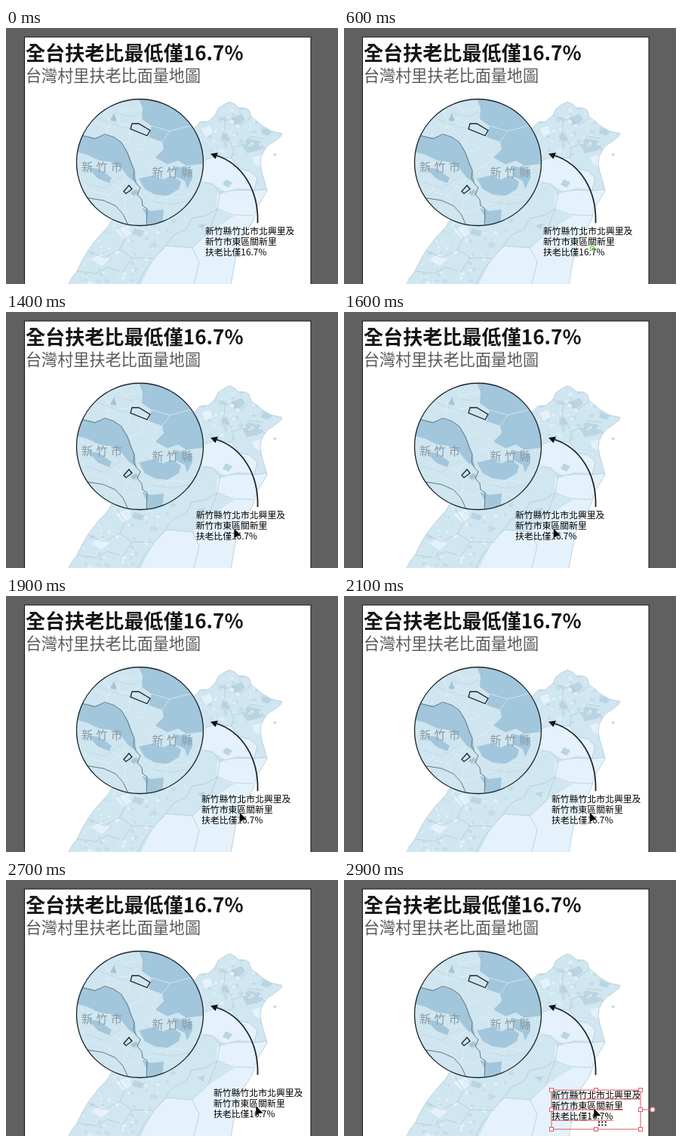
These frames come from a looping animation (440 by 340 pixels, 3 s). An HTML page:

```html
<!DOCTYPE html>
<html lang="zh-Hant">
<head>
<meta charset="utf-8">
<style>
  html, body { margin: 0; width: 100%; height: 100%; overflow: hidden; background: #606060; }
  svg { display: block; width: 440px; height: 340px; font-family: "Noto Sans CJK TC", "Noto Sans CJK", sans-serif; }
  .title { font-size: 26.1px; font-weight: 700; fill: #151515; }
  .sub { font-size: 21.1px; fill: #58595b; }
  .place { font-size: 15px; font-weight: 300; letter-spacing: 4.5px; fill: #8798a3; }
  .note { font-size: 11.85px; font-weight: 500; fill: #000; }
  .line { fill: none; stroke: #adc4ce; stroke-width: .7; }
  .white { fill: none; stroke: #e4f1f7; stroke-width: .7; }
  .ink { fill: none; stroke: #1b242a; stroke-width: 1.3; }
  .light { fill: #e5f2fb; }
  .mid { fill: #b9d4e2; }
  .dark { fill: #a2c6db; }
  #frame { fill: none; stroke: #df5a60; stroke-width: 1; }
  #frame .grip { fill: #fff; }
</style>
</head>
<body>
<svg viewBox="0 0 440 340">
  <defs>
    <path id="coast" d="M250 133L257 125 268 124 277 116 281 107 290 101 296 98 303 101 308 106 316 106 322 109 325 118 333 124 340 130 352 137 366 140 364 144 354 152 347 156 342 163 338 171 337 180 339 191 343 205 346 216 342 223 337 231 332 239 330 248 326 259 319 270 311 282 306 296 302 318 298 342H82L87 332 94 323 101 309 109 295 122 278 135 264 144 248 180 180Z"/>
    <clipPath id="land"><use href="#coast"/></clipPath>
    <clipPath id="lens"><circle cx="177.5" cy="178.5" r="84"/></clipPath>
  </defs>

  <rect width="440" height="340" fill="#606060"/>
  <rect x="24.5" y="12" width="379.5" height="340" fill="#fff" stroke="#111"/>
  <text class="title" x="26" y="43">全台扶老比最低僅16.7%</text>
  <text class="sub" x="26" y="70.5">台灣村里扶老比面量地圖</text>

  <use href="#coast" fill="#d0e6f0"/>
  <g clip-path="url(#land)">
    <g class="light">
      <path d="M258 176L276 171 299 173 309 187 323 190 333 199 329 214 307 212 293 219 274 207 260 204Z"/>
      <path d="M280 222L304 216 330 216 346 214 331 248 306 252 279 240Z"/>
      <path d="M196 306L214 289 246 292 268 272 299 252 330 247 300 342H178Z"/>
      <path d="M259 134L270 130 274 139 265 145ZM326 172L338 169 337 184 330 181Z"/>
      <path d="M145 268L158 263 167 272 156 280ZM112 307L126 300 137 307 127 316Z"/>
    </g>
    <g class="mid">
      <path d="M313 155L322 147 337 150 342 160 330 164 319 166Z"/>
      <path d="M300 119L312 114 317 121 308 130 298 126Z"/>
      <path d="M284 143L292 139 297 148 289 153ZM340 132L353 138 347 143 338 140Z"/>
      <path d="M291 201L300 205 295 212 287 208ZM170 266L183 270 179 277 167 273ZM253 262L264 260 261 268Z"/>
    </g>
    <g id="specks"></g>
    <path class="line" d="M262 205L274 207 284 218 280 240 265 249 246 253M284 218L304 215 329 216 346 214M299 173L309 187 323 190 333 199 329 216M262 176L276 171 299 173 302 158 315 154 323 144 341 147M280 240L300 248 328 249M246 253L239 267 222 275 211 289 197 306 184 322 175 340M211 289L247 292 268 272 280 240M147 262L158 278 151 294 167 305 197 306M109 296L130 305 151 294M94 323L119 326 134 318 155 324 167 305M247 292L256 311 249 340M280 117L291 123 301 119 310 130 324 119M291 123L288 141 302 158"/>
  </g>
  <use href="#coast" class="line"/>
  <path d="M354 168l3-2 2 3-3 1Z" fill="#c3d9e3"/>

  <circle cx="177.5" cy="178.5" r="84" fill="#cfe5ef"/>
  <g clip-path="url(#lens)">
    <g class="dark">
      <path d="M175 92L181 106 180 121 193 130 189 145 207 151 209 161 198 172 214 181 228 176 239 183 265 180 265 92Z"/>
      <path d="M90 140L118 146 131 142 145 146 154 153 162 166 167 180 171 190 173 206 163 199 151 184 139 178 124 176 107 168 92 164Z"/>
      <path d="M176 200L193 196 209 201 220 196 232 204 229 214 214 223 197 221 184 214Z"/>
      <path d="M222 183L247 188 247 200 240 213 237 203 226 198Z"/>
      <path d="M138 123L143 113 147 124ZM108 185L123 187 140 199 137 206 122 200Z"/>
      <path d="M180 239L193 243 209 241 207 264H186L187 251ZM165 218l8-4 3 6-7 4Z"/>
    </g>
    <path class="white" d="M112 121L135 132 167 127 180 121M128 107L138 123 135 132 131 142M147 124L165 134 162 151 154 153M150 99L156 111 147 124M156 111L180 106M165 134L187 143 178 160 162 166M178 160L198 172M189 145L200 157M193 130L217 137 244 130M217 137L207 151M171 190L190 181 198 172M190 181L193 196M92 181L108 185 124 176M122 200L116 217 95 209M116 217L136 222 151 211 137 206M151 211L163 199M136 222L145 235M151 211L159 228 174 220M159 228L155 246M187 236L214 223 236 226 250 214M214 223L211 241 236 246M155 246L172 242 186 236"/>
    <path class="line" d="M118 118L147 130 167 134M143 113L168 118 178 112M105 205L130 213 154 197M193 230L220 234 246 229" opacity=".6"/>
    <path class="ink" d="M90 139L102 143 118 147 131 141 143 145 153 152 161 166 166 180 170 189 169 199 173 207 178 212 174 221 180 228 181 236 187 240 186 264M104 225L129 229 145 236 155 247 162 262" style="stroke:#66777f;stroke-width:1"/>
    <text class="place" x="100" y="189.5">新竹市</text>
    <text class="place" x="193.5" y="196.5">新竹縣</text>
    <path class="ink" d="M167 127L176 127 191 136 187 143 165 134ZM156 217L163 209 167 214 159 220Z"/>
  </g>
  <circle class="ink" cx="177.5" cy="178.5" r="84"/>
  <path class="ink" d="M333.5 259C335 215 313 180 278 169" style="stroke-width:1.8"/>
  <path d="M271 167L281 165.5 277.5 174Z" fill="#111"/>

  <g id="label">
    <g class="note">
      <text x="264" y="274.2">新竹縣竹北市北興里及</text>
      <text x="264" y="288.4">新竹市東區關新里</text>
      <text x="264" y="302.4">扶老比僅16.7%</text>
    </g>
    <g id="frame">
      <path d="M264 275H382M264 289.2H358.5M264 303.3H346M382 289H395"/>
      <rect x="264" y="263" width="118" height="52"/>
      <circle class="grip" cx="398" cy="289" r="3.2"/>
    </g>
  </g>
  <rect id="hint" x="326.5" y="290.5" width="5" height="5" fill="none" stroke="#63d13e" stroke-width="1.2"/>
  <g id="cursor">
    <path d="M0 0V14.5L4 10.8 10 10.3Z" fill="#000" stroke="#fff" stroke-width=".5"/>
    <path id="dots" d="M6 18.5h11M6 22.5h11" stroke="#111" stroke-width="2" stroke-dasharray="2 2.3"/>
  </g>
</svg>
<script>
const $ = id => document.getElementById(id);

function add(parent, name, attrs) {
  const el = document.createElementNS("http://www.w3.org/2000/svg", name);
  for (const key in attrs) el.setAttribute(key, attrs[key]);
  parent.appendChild(el);
}

let seed = 17;
const rand = () => (seed = seed * 16807 % 2147483647) / 2147483647;

// Small villages, densest along the west and the north
function village(x, y, size, fill) {
  let d = "";
  for (let i = 0; i < 5; i++) {
    const a = i * Math.PI * 0.4, r = size * (0.5 + rand());
    d += (i ? "L" : "M") + (x + r * Math.cos(a)).toFixed(1) + " " + (y + r * Math.sin(a) * 0.8).toFixed(1);
  }
  add($("specks"), "path", { d: d + "Z", fill, stroke: "#bdd5df", "stroke-width": 0.25 });
}
for (let i = 0; i < 170; i++) {
  const fill = ["#e5f2fb", "#e0eff6", "#c3dce8"][Math.floor(rand() * 3)];
  if (i % 2) village(250 + rand() * 95, 104 + rand() * 66, 1 + rand() * 2.2, fill);
  else {
    const y = 250 + rand() * 90;
    village(144 - (y - 250) * 0.65 + rand() * 85, y, 1 + rand() * 2.6, fill);
  }
}

for (const x of [264, 323, 382])
  for (const y of [263, 289, 315])
    if (x !== 323 || y !== 289)
      add($("frame"), "rect", { class: "grip", x: x - 2.5, y: y - 2.5, width: 5, height: 5 });

// time, label dx, label dy
const moves = [
  [0, 0, 0], [1300, 0, 0], [1600, -37, 0], [1700, -37, 0], [2000, 11, 0],
  [2400, 11, 0], [2500, 11, 5.5], [2800, 11, 16], [3000, 11, 16]
];

function offset(t) {
  const i = moves.findIndex(m => m[0] > t);
  const a = moves[i - 1], b = moves[i], k = (t - a[0]) / (b[0] - a[0]);
  return [a[1] + (b[1] - a[1]) * k, a[2] + (b[2] - a[2]) * k];
}

const show = (id, on) => $(id).style.display = on ? "" : "none";
const move = (id, x, y) => $(id).setAttribute("transform", `translate(${x} ${y})`);

function draw(now) {
  const t = Math.floor(now % 3000 / 100) * 100;
  const [dx, dy] = offset(t);
  move("label", dx, dy);
  move("cursor", t < 2200 ? 314.5 + dx : Math.min(331, 325.5 + (t - 2100) / 50), 287 + dy);
  show("hint", t === 600);
  show("frame", t >= 800 && t <= 1300 || t >= 2200 && t <= 2400 || t === 2900);
  show("cursor", t >= 1200);
  show("dots", t === 2900);
}

function tick() {
  draw(performance.now());
  requestAnimationFrame(tick);
}
tick();
</script>
</body>
</html>
```
